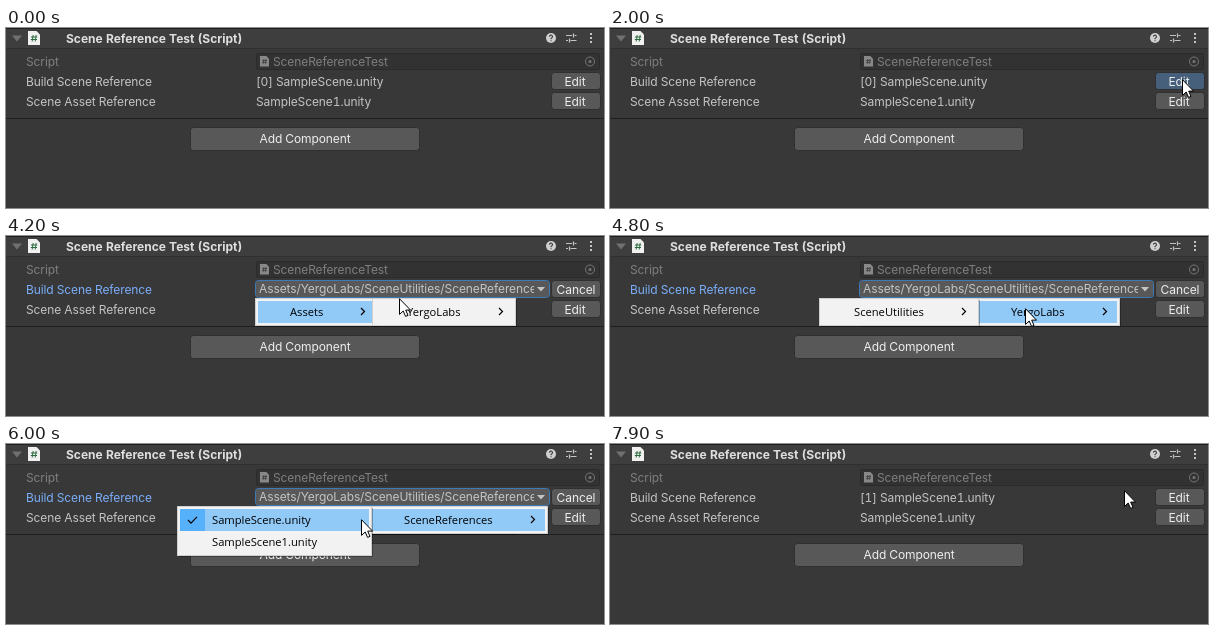
These frames come from a looping animation (598 px wide and 180 px high, 8000 ms). An HTML page:

```html
<!DOCTYPE html>
<html lang="en">
<head>
<meta charset="utf-8">
<title>Scene reference inspector</title>
<style>
  html, body { margin: 0; width: 598px; height: 180px; overflow: hidden; background: #383838; }
  svg { display: block; }
  text { font: 12px Inter, Roboto, sans-serif; font-variant-numeric: tabular-nums; letter-spacing: -.1px; fill: #c4c4c4; }
  .title { font-weight: 700; letter-spacing: 0; fill: #dedede; }
  .dim { fill: #7f7f7f; }
  .focus { fill: #7baefa; }
  .mid { text-anchor: middle; fill: #eee; }
  .button { fill: #585858; stroke: #303030; }
  .pressed { fill: #46607c; }
  .menu text { font: 11.2px "Open Sans", "Noto Sans", sans-serif; letter-spacing: 0; fill: #000; }
  .panel { fill: #f2f2f2; stroke: #cfcfcf; }
  .hover { fill: #91c9f7; }
  .line { fill: none; stroke: #000; stroke-width: 1.2; }
</style>
</head>
<body>
<svg width="598" height="180" viewBox="0 0 598 180">
  <defs>
    <clipPath id="fieldClip"><rect x="250" y="44" width="278" height="18"/></clipPath>
    <g id="script">
      <path d="M0 0H8.5L12 3.5V14H0Z" stroke="none"/>
      <path d="M5.2 4 4.2 10.5M8.2 4 7.2 10.5M3 6H9.2M2.8 8.5H9" fill="none"/>
    </g>
  </defs>

  <!-- header -->
  <rect width="598" height="180" fill="#383838"/>
  <rect width="598" height="20" fill="#3e3e3e"/>
  <rect width="598" height="1" fill="#1f1f1f"/>
  <rect y="20" width="598" height="1" fill="#303030"/>
  <path d="M6 7.5H16L11 13.5Z" fill="#707070"/>
  <use href="#script" x="22" y="3" fill="#f0f0f0" stroke="#2f6b40"/>
  <text class="title" x="60" y="15">Scene Reference Test (Script)</text>
  <circle cx="545" cy="10" r="5" fill="#d0d0d0"/>
  <path d="M543.4 8.7Q543.6 7 545.1 7.1T546.5 8.8Q546.3 9.6 545.1 10.4V11.2M545.1 12.2V13.3" fill="none" stroke="#3e3e3e" stroke-width="1.1"/>
  <path d="M560 7.5H566M568.5 7.5H570.5M567.5 5.5V9.5M560 12.5H562M564.5 12.5H570.5M563.5 10.5V14.5" fill="none" stroke="#c4c4c4" stroke-width="1.2"/>
  <path d="M584 5h2v2h-2zM584 9h2v2h-2zM584 13h2v2h-2z" fill="#c4c4c4"/>

  <!-- script row -->
  <text class="dim" x="20" y="38">Script</text>
  <rect x="250.5" y="25.5" width="343" height="16" rx="2" fill="#323232" stroke="#2a2a2a"/>
  <use href="#script" transform="translate(254 28) scale(.75)" fill="#888" stroke="#383838"/>
  <text class="dim" x="267" y="38">SceneReferenceTest</text>
  <circle cx="584" cy="33.5" r="4.5" fill="none" stroke="#777"/>
  <circle cx="584" cy="33.5" r="1.5" fill="#777"/>

  <!-- build scene row -->
  <rect class="button" x="545.5" y="44.5" width="49" height="17" rx="3"/>
  <g data-on="0 2100">
    <text x="20" y="58">Build Scene Reference</text>
    <text x="250" y="58">[0] SampleScene.unity</text>
    <rect class="button pressed" x="545.5" y="44.5" width="49" height="17" rx="3" data-on="2000 2100"/>
    <text class="mid" x="569" y="58">Edit</text>
  </g>
  <g data-on="2100 7300">
    <text class="focus" x="20" y="58">Build Scene Reference</text>
    <rect x="249.5" y="44.5" width="294" height="17" rx="3" fill="#515151" stroke="#303030"/>
    <rect x="250" y="45" width="293" height="16" rx="2" fill="#585858" data-on="2500 7300"/>
    <rect x="249.5" y="44.5" width="294" height="17" rx="3" fill="none" stroke="#3f7ab8" data-on="3000 7300"/>
    <g clip-path="url(#fieldClip)">
      <text x="253" y="57">Assets/YergoLabs/SceneUtilities/SceneReferences/SampleScene.unity</text>
    </g>
    <path d="M531 51H539L535 55.5Z" fill="#c4c4c4"/>
    <text class="mid" x="570" y="58">Cancel</text>
  </g>
  <g data-on="7300 8000">
    <text x="20" y="58">Build Scene Reference</text>
    <text x="250" y="58">[1] SampleScene1.unity</text>
    <text class="mid" x="569" y="58">Edit</text>
  </g>

  <!-- asset row and footer -->
  <text x="20" y="78">Scene Asset Reference</text>
  <text x="250" y="78">SampleScene1.unity</text>
  <rect class="button" x="545.5" y="64.5" width="49" height="17" rx="3"/>
  <text class="mid" x="569" y="78">Edit</text>
  <rect y="90" width="598" height="1" fill="#1f1f1f"/>
  <rect class="button" x="184.5" y="99.5" width="229" height="23" rx="3"/>
  <text class="mid" x="299" y="115">Add Component</text>

  <g id="menus" class="menu"></g>
  <path id="cursor" d="M.5 .7V16.4L4.2 13 6.6 18.4 9 17.4 6.7 12.1H11.5Z" fill="#fff" stroke="#000" stroke-linejoin="round"/>
</svg>

<script>
  const LOOP = 8000, STEP = 100;
  const OPEN = 3100, CLOSE = 7200, DELAY = 400;
  const TOP = 62, ROW = 22, PAD = 3, GUTTER = 25;

  // Each menu opens a fixed delay after the row in its parent is hovered.
  const menus = [
    { labels: ["Assets"], hover: 3400 },
    { labels: ["YergoLabs"], hover: 4400 },
    { labels: ["SceneUtilities"], hover: 5000, left: true },
    { labels: ["SceneReferences"], hover: 5600 },
    { labels: ["SampleScene.unity", "SampleScene1.unity"], hover: 6000, next: 6600, left: true }
  ];

  const pen = document.createElement("canvas").getContext("2d");
  pen.font = '11.2px "Open Sans", "Noto Sans", sans-serif';

  function layOut(menu, parent) {
    menu.w = Math.round(Math.max(...menu.labels.map(s => pen.measureText(s).width))) + 90;
    menu.open = parent ? parent.hover + DELAY : OPEN;
    if (!parent) menu.x = 249;
    else menu.x = menu.left ? parent.x + PAD - menu.w : parent.x + parent.w - 2 * PAD;
  }

  const bar = (x, y, w, attrs) => `<rect x="${x}" y="${y}" width="${w}" height="${ROW}" ${attrs}/>`;

  function rowMarkup(menu, label, i) {
    const x = menu.x + PAD, y = TOP + PAD + i * ROW;
    const leaf = menu.labels.length > 1, checked = leaf && i === 0;
    const from = i ? menu.next : menu.hover;
    const to = checked ? menu.next : CLOSE;
    let mark = "";
    if (checked) mark = `<path class="line" d="M${x + 8} ${y + 11}l3 3.2 6 -6.4"/>`;
    if (!leaf) mark = `<path class="line" d="M${x + menu.w - 20} ${y + 7}l3.5 3.5 -3.5 3.5"/>`;
    return (checked ? bar(x, y, GUTTER, 'class="hover"') : "") +
      `<g data-on="${from} ${to}">` + bar(x, y, menu.w - 2 * PAD, 'class="hover"') +
      (checked ? bar(x, y, GUTTER, 'fill="#56b0fa"') : "") + "</g>" +
      `<text x="${x + 32}" y="${y + 15}">${label}</text>` + mark;
  }

  function menuMarkup(menu) {
    const h = menu.labels.length * ROW + 2 * PAD;
    const box = (shift, attrs) =>
      `<rect x="${menu.x + shift}" y="${TOP + shift}" width="${menu.w - 1}" height="${h - 1}" ${attrs}/>`;
    return `<g data-on="${menu.open} ${CLOSE}">` +
      box(2, 'fill="#000" opacity=".3"') + box(.5, 'class="panel"') +
      menu.labels.map((label, i) => rowMarkup(menu, label, i)).join("") + "</g>";
  }

  menus.forEach((menu, i) => layOut(menu, menus[i - 1]));
  document.getElementById("menus").innerHTML = menus.map(menuMarkup).join("");

  // Pointer moves, each starting where the previous one ended.
  const start = { x: 600, y: 180 };
  const moves = [
    { from: 0, to: 500, x: 573, y: 55 },
    { from: 600, to: 700, x: 572, y: 51 },
    { from: 2300, to: 2500, x: 509, y: 46 },
    { from: 3100, to: 3500, x: 302, y: 73 },
    { from: 3800, to: 4200, x: 393, y: 62 },
    { from: 4300, to: 4600, x: 442, y: 73 },
    { from: 4600, to: 5200, x: 338, y: 68 },
    { from: 5400, to: 5700, x: 383, y: 75 },
    { from: 5800, to: 6300, x: 304, y: 76 },
    { from: 6400, to: 6700, x: 309, y: 95 },
    { from: 7200, to: 7900, x: 514, y: 46 }
  ];

  function pointerAt(t) {
    let { x, y } = start;
    for (const m of moves) {
      const k = Math.min(1, Math.max(0, (t - m.from) / (m.to - m.from)));
      const ease = k * k * (3 - 2 * k);
      x += (m.x - x) * ease;
      y += (m.y - y) * ease;
    }
    return [Math.round(x), Math.round(y)];
  }

  const cursor = document.getElementById("cursor");
  const timed = [...document.querySelectorAll("[data-on]")].map(el => ({
    el, span: el.dataset.on.split(" ").map(Number)
  }));

  function draw() {
    const t = Math.floor(performance.now() % LOOP / STEP) * STEP;
    for (const { el, span: [from, to] } of timed)
      el.style.display = t >= from && t < to ? "" : "none";
    cursor.setAttribute("transform", `translate(${pointerAt(t)})`);
    requestAnimationFrame(draw);
  }
  draw();
</script>
</body>
</html>
```
